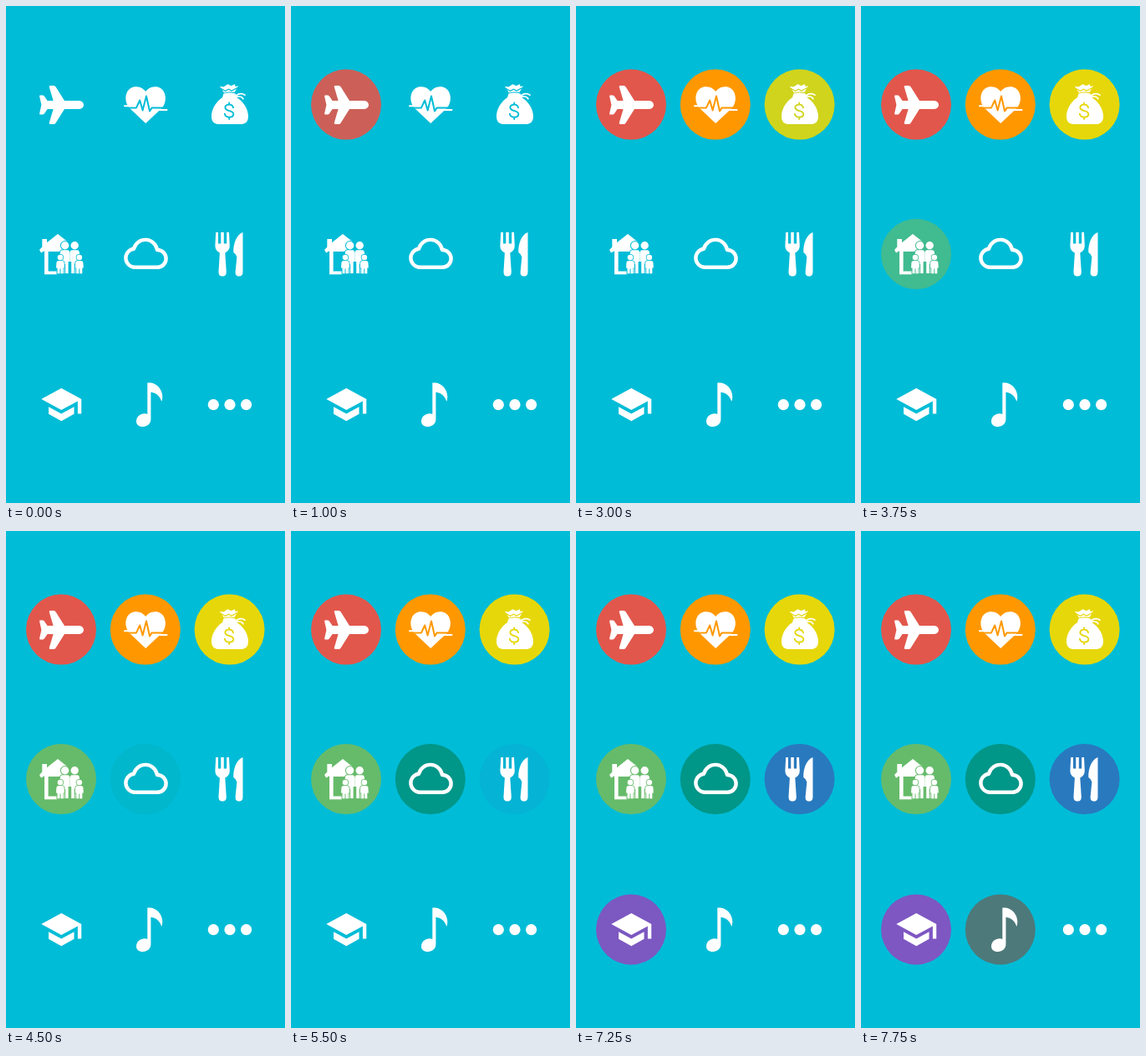
Recreate the animation shown at these times as an HTML page. Size 334 px wide and 593 px high, loop 8000 ms.

```html
<!DOCTYPE html>
<html lang="en">
<head>
<meta charset="utf-8">
<title>Category icons</title>
<style>
  html, body { margin: 0; width: 100%; height: 100%; overflow: hidden; background: #00bcd7; }
  svg { display: block; width: 100vw; height: 100vh; }
  #discs circle { opacity: 0; }
  .line { fill: none; stroke-linecap: round; stroke-linejoin: round; }
</style>
</head>
<body>
<svg viewBox="0 0 334 593" preserveAspectRatio="none">
  <defs>
    <mask id="heartCut" maskUnits="userSpaceOnUse" x="130" y="85" width="75" height="65">
      <rect x="130" y="85" width="75" height="65" fill="#fff"/>
      <path class="line" stroke="#000" stroke-width="2" d="M142 121.4H156L160.2 112.5L163.6 124.5L168 107.5L172 125.5L174.5 121.6H193"/>
    </mask>
    <mask id="bagCut" maskUnits="userSpaceOnUse" x="235" y="85" width="65" height="65">
      <rect x="235" y="85" width="65" height="65" fill="#fff"/>
      <g class="line" stroke="#000">
        <path stroke-width="1.9" d="M272 121.2C271.5 118.7 269.7 117.6 267.2 117.6C264.3 117.6 262.4 119 262.4 121.3C262.4 126.4 272.3 123.8 272.3 129C272.3 131.4 270.2 132.7 267.3 132.7C264.2 132.7 262.3 131.4 261.9 128.7M267.2 115.5V117M267.2 133V135"/>
        <path stroke-width="1.3" d="M257 98.2L262.5 101.5L266.5 99.3L270 101.3L277 97.5"/>
      </g>
    </mask>
    <g id="adult">
      <circle cx="70.6" cy="285.8" r="4.7"/>
      <path d="M67.5 291.2H73.7Q76.3 291.5 76.4 295V305H74.6V319H71.1V308H70.1V319H66.6V305H64.8V295Q64.9 291.5 67.5 291.2Z"/>
    </g>
    <g id="child">
      <circle cx="65" cy="300" r="3.3"/>
      <path d="M63 304H67Q69.2 304.2 69.6 306L70 312.5H68.5V319.3H65.5V313.5H64.5V319.3H61.5V312.5H60L60.4 306Q60.8 304.2 63 304Z"/>
    </g>
    <g id="adults"><use href="#adult"/><use href="#adult" x="11.6"/></g>
    <g id="kids"><use href="#child"/><use href="#child" x="22.8"/></g>
    <mask id="houseCut" maskUnits="userSpaceOnUse" x="35" y="265" width="65" height="60">
      <rect x="35" y="265" width="65" height="60" fill="#fff"/>
      <g stroke="#000" stroke-width="2"><use href="#adults"/><use href="#kids"/></g>
    </mask>
    <mask id="adultCut" maskUnits="userSpaceOnUse" x="35" y="265" width="65" height="60">
      <rect x="35" y="265" width="65" height="60" fill="#fff"/>
      <use href="#kids" stroke="#000" stroke-width="1.6"/>
    </mask>
  </defs>

  <g id="discs"></g>

  <g fill="#fff">
    <!-- plane -->
    <path d="M87.5 113C91 113.2 93 115.8 93 118S91 122.8 87.5 123H70L59.6 139.5Q58.6 141 57 141H53Q51.3 141 51.8 139.3L56.6 123H49.6L45.8 128.5Q45 129.6 43.6 129.6H41.2Q39.8 129.6 40.1 128.2L42.4 118L40.1 107.8Q39.8 106.4 41.2 106.4H43.6Q45 106.4 45.8 107.5L49.6 113H56.6L51.8 96.7Q51.3 95 53 95H57Q58.6 95 59.6 96.5L70 113Z"/>
    <!-- heart -->
    <path mask="url(#heartCut)" d="M167.2 140L147.5 121.5C140 112 143 97 155 96.2C161 96 165 99 167.2 102C169.4 99 173.4 96 179.4 96.2C191 97 194.4 112 187 121.5Z"/>
    <path class="line" stroke="#fff" stroke-width="2" d="M142 119.3H155M176 124H192.5"/>
    <!-- money bag -->
    <g mask="url(#bagCut)">
      <path d="M256 96L260.5 96.5L265.5 93.2L269.5 95.2L274 93.2L274.5 96L278 95.5L273.5 103Q267.5 101.6 261 103.4Z"/>
      <path d="M260.5 104.5Q267.5 102.6 274.5 104.5L276.5 109.3C283 113 290 122 290 131.5C290 138.5 286.5 141 280.5 141H255.5C249.5 141 246 138.5 246 131.5C246 122 252.5 113 259 109.3Z"/>
    </g>
    <path class="line" stroke="#fff" stroke-width="1.7" d="M275.5 106.8Q281 103 286 106.2M276.5 108.2Q282 107.2 284 110.8"/>
    <!-- house and family -->
    <g mask="url(#houseCut)">
      <path d="M43.3 278H49V282.2L62 272L74 281.5V293H50.6V316.6H61.5V320.3H46V292.3L42 294.5L40 291L43.3 287.5Z"/>
    </g>
    <use href="#adults" mask="url(#adultCut)"/>
    <use href="#kids"/>
    <!-- cloud -->
    <path class="line" stroke="#fff" stroke-width="4.4" d="M154.4 311.8A11.1 11.1 0 0 1 153 289.7A14.3 14.3 0 0 1 181 291A10.4 10.4 0 0 1 181.4 311.8Z"/>
    <!-- fork and knife -->
    <path d="M251.2 270H254V283.5H257.3V270H260.8V283.5H264.2V270H267L267.8 286Q267.8 291.8 262.3 294.5L263.8 317Q263.9 322.6 259.1 322.6Q254.3 322.6 254.5 317L255.9 294.5Q250.3 291.8 250.4 286Z"/>
    <path d="M283.5 270V317.5Q283.4 322.6 279 322.6Q274.5 322.6 274.6 317.5L276.4 299.5Q275.8 296 272.3 294C271.8 283 276.5 272.5 283.5 270Z"/>
    <!-- graduation cap -->
    <path transform="translate(40.1 449.4) scale(2.18)" d="M5 13.18v4L12 21l7-3.82v-4L12 17ZM12 3L1 9l11 6l9-4.91V17h2V9Z"/>
    <!-- note -->
    <path d="M169.3 449.5H173C180.5 450.3 187.2 457.5 187.3 466Q187.3 469.5 186.3 472C184 465 179.5 461.5 173.4 460.8V493C173.4 498.5 169 502 163.8 502C159 502 156 499.5 156 495.5C156 490 161 486.3 166 486.3Q168 486.3 169.3 487Z"/>
    <!-- more -->
    <circle cx="248.3" cy="475.7" r="6.6"/>
    <circle cx="268" cy="475.7" r="6.6"/>
    <circle cx="287.6" cy="475.7" r="6.6"/>
  </g>
</svg>
<script>
  const LOOP = 8000, TICK = 250, FIRST = 2, STAGGER = 4;
  const COLORS = ['#e2574c', '#ff9800', '#e6d70a', '#66bb6a', '#009688', '#2979bf', '#7e57c2', '#795548'];
  const ROWS = [117.6, 296.1, 475.5];
  // a one-second ease, sampled at each tick
  const FADE = [0.14, 0.645, 0.905, 0.985, 1];

  const layer = document.getElementById('discs');
  const discs = COLORS.map((fill, i) => {
    const disc = document.createElementNS('http://www.w3.org/2000/svg', 'circle');
    const attrs = { cx: 66 + (i % 3) * 100.8, cy: ROWS[Math.floor(i / 3)], r: 42, fill };
    for (const key in attrs) disc.setAttribute(key, attrs[key]);
    return layer.appendChild(disc);
  });

  function draw(now) {
    const tick = Math.floor((now % LOOP) / TICK);
    discs.forEach((disc, i) => {
      const step = tick - FIRST - i * STAGGER;
      disc.style.opacity = step < 0 ? 0 : FADE[Math.min(step, FADE.length - 1)];
    });
  }

  const start = performance.now();
  function frame() {
    draw(performance.now() - start);
    requestAnimationFrame(frame);
  }
  frame();
</script>
</body>
</html>
```
